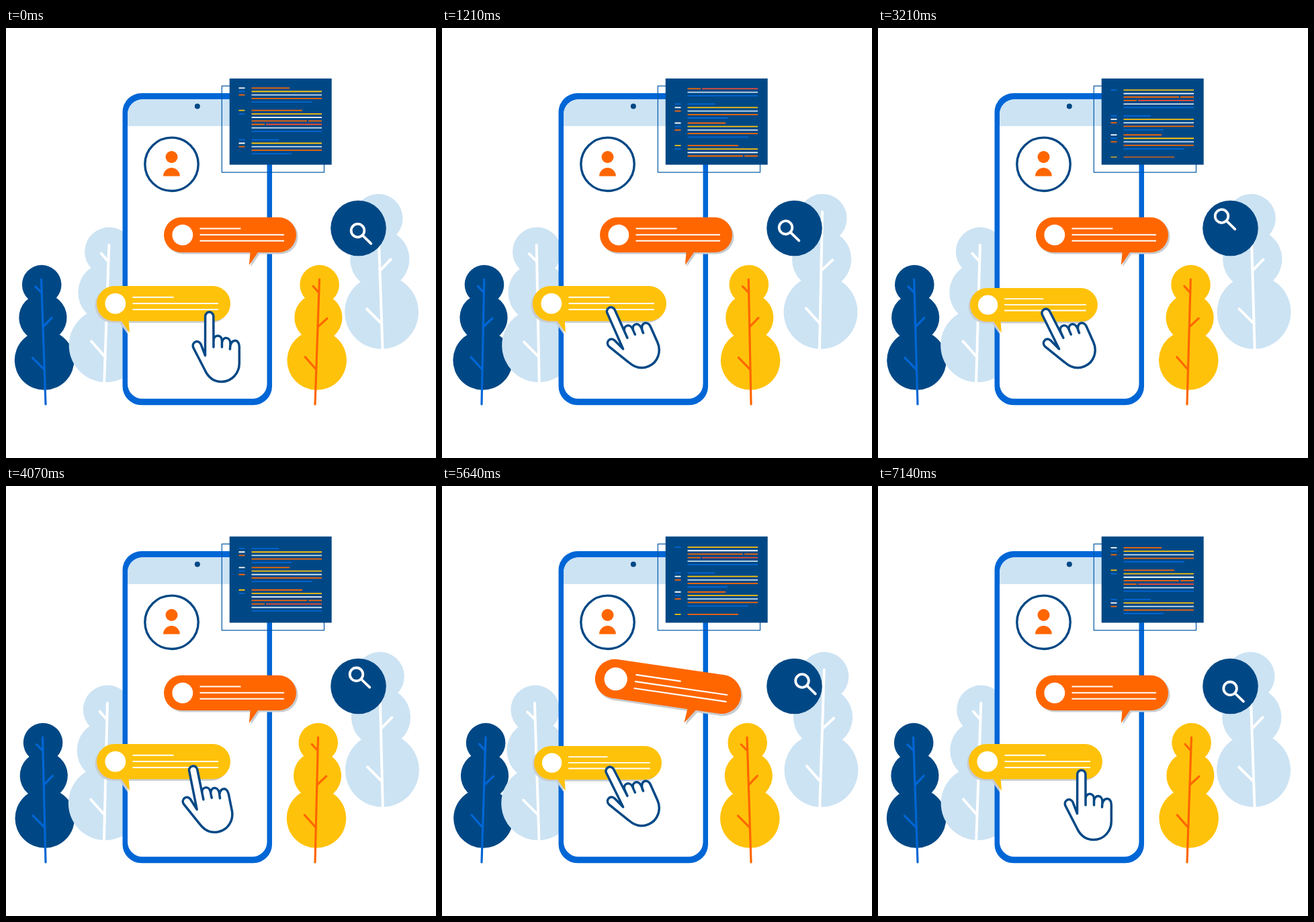
Recreate the animation shown at these times as an HTML page. Size 640 by 640 pixels, loop 7.21 s.

```html
<!DOCTYPE html>
<html lang="en">
<head>
<meta charset="utf-8">
<title>Chat illustration</title>
<style>
  html, body { margin: 0; height: 100%; overflow: hidden; background: #fff; }
  svg { display: block; width: 100vw; height: 100vh; }
</style>
</head>
<body>
<svg id="stage" viewBox="0 0 640 640"></svg>
<script>
const NAVY = '#004885', BLUE = '#0066d6', PALE = '#cce3f3', ORANGE = '#ff6600',
      YELLOW = '#ffc20a', RED = '#f44c32', WHITE = '#fff', SHADE = '#c9cccf';
const LOOP = 7210, SWAY = 3600, TAP = 2400;
const SCROLL = 105.3, CODE_TOP = 90, PITCH = 5.2;

// Markup helpers

const line = (x1, x2, y, color, width) =>
  `<path d="M${x1} ${y}H${x2}" stroke="${color}" stroke-width="${width}"/>`;

const tree = (id, leaf, stem) => `<g id="${id}">
  <g fill="${leaf}"><circle cx=".4" cy="-178" r="29.3"/><circle cx=".4" cy="-129" r="35.6"/>
    <circle cx=".4" cy="-65.5" r="44.3"/></g>
  <path d="M0 0V-186M-17.2-69.8L0-51.5M13.5-128.3L0-115M-9-175.5L0-166"
    fill="none" stroke="${stem}" stroke-width="3.2" stroke-linecap="round"/></g>`;

function bubble(id, color, x, y, width, tail, shadowX) {
  const shape = `<rect x="${x}" y="${y}" width="${width}" height="52.3" rx="26.1"/><path d="${tail}"/>`;
  const text = x + 53.5;
  return `<g id="${id}">
    <g fill="${SHADE}" transform="translate(${shadowX} 2.5)">${shape}</g>
    <g fill="${color}">${shape}</g>
    <circle cx="${x + 27.8}" cy="${y + 26.2}" r="15.4" fill="${WHITE}"/>
    ${line(text, text + 61, y + 16.8, WHITE, 2)}
    ${line(text, text + width - 71.5, y + 25.9, WHITE, 2)}
    ${line(text, text + width - 71.5, y + 35, WHITE, 2)}</g>`;
}

// Each row: optional gutter mark colour, then [end, colour] segments from the left margin.
const codeBlocks = [
  { y: 0, rows: [[WHITE, [422, ORANGE]], [BLUE, [470, YELLOW]], [ORANGE, [470, PALE]],
    [null, [470, ORANGE]], [null, [456, BLUE]]] },
  { y: 33.4, rows: [[YELLOW, [441, ORANGE]], [BLUE, [470, YELLOW]], [null, [470, WHITE]],
    [null, [448, ORANGE], [470, ORANGE]], [null, [385, ORANGE], [470, RED]],
    [null, [470, PALE]], [null, [470, BLUE]]] },
  { y: 77, rows: [[BLUE, [406, BLUE]], [WHITE, [470, YELLOW]], [ORANGE, [470, PALE]],
    [null, [470, ORANGE]], [null, [425, BLUE]]] },
];

const code = codeBlocks.map(({ y, rows }) => rows.map(([mark, ...segments], i) => {
  const rowY = y + i * PITCH;
  let start = 365.5, out = mark ? line(346.5, 355.5, rowY, mark, 1.8) : '';
  for (const [end, color] of segments) {
    out += line(start, end, rowY, color, 1.8);
    start = end + 2;
  }
  return out;
}).join('')).join('');

const stage = document.getElementById('stage');
stage.innerHTML = `
  <defs>
    <clipPath id="screen"><rect x="181" y="106.3" width="207.5" height="445.5" rx="22"/></clipPath>
    <clipPath id="codeArea"><rect x="333" y="88" width="152" height="104.8"/></clipPath>
  </defs>
  ${tree('navyTree', NAVY, BLUE)}
  ${tree('leftTree', PALE, WHITE)}
  <rect x="173.5" y="97" width="222.5" height="464.3" rx="28" fill="${BLUE}"/>
  <g clip-path="url(#screen)">
    <rect x="173" y="97" width="223" height="465" fill="${WHITE}"/>
    <rect x="173" y="97" width="223" height="49" fill="${PALE}"/>
  </g>
  <circle cx="284.8" cy="116.5" r="4" fill="${NAVY}"/>
  <circle cx="246.5" cy="202.8" r="39.7" fill="${WHITE}" stroke="${NAVY}" stroke-width="3.4"/>
  <g fill="${ORANGE}"><circle cx="246.5" cy="192" r="9"/>
    <path d="M234 220.4a12.4 12.4 0 0 1 24.8 0z"/></g>
  ${tree('rightTree', PALE, WHITE)}
  ${tree('yellowTree', YELLOW, ORANGE)}
  <circle cx="524.5" cy="298" r="41.3" fill="${NAVY}"/>
  <g id="lens" fill="none" stroke="${WHITE}" stroke-width="3.8" stroke-linecap="round">
    <circle r="9.8"/><path d="M7.2 7.2L19.8 19.4"/></g>
  <rect x="321.3" y="86.3" width="152.2" height="128.5" fill="none" stroke="#0058a8" stroke-width="1.2"/>
  <rect x="332.7" y="75.2" width="152" height="128.3" fill="${NAVY}"/>
  <g clip-path="url(#codeArea)"><g id="code">${code}<g transform="translate(0 ${SCROLL})">${code}</g></g></g>
  ${bubble('orangeBubble', ORANGE, 235, 281.8, 197, 'M363.8 331L361.8 353L377 331z', 2.5)}
  ${bubble('yellowBubble', YELLOW, 135, 384, 199, 'M169.5 433L184 453.8L182.5 433z', -2.5)}
  <path id="hand" fill="${WHITE}" stroke="${NAVY}" stroke-width="3.5" stroke-linecap="round" stroke-linejoin="round"/>`;

const part = Object.fromEntries([...stage.querySelectorAll('g[id], path[id]')].map(el => [el.id, el]));
const move = (name, transform) => part[name].setAttribute('transform', transform);
const scaleAround = (s, x, y) => `translate(${x} ${y}) scale(${s}) translate(${-x} ${-y})`;

// Motion helpers

// Equals cubic-bezier(.42, 0, .58, 1).
function ease(x) {
  let low = 0, high = 1, u = 0.5;
  for (let i = 0; i < 18; i++) {
    u = (low + high) / 2;
    const at = 1.26 * u * (1 - u) ** 2 + 1.74 * (1 - u) * u * u + u ** 3;
    if (at < x) low = u; else high = u;
  }
  return u * u * (3 - 2 * u);
}

// Eased value through [fraction, value] keys.
function track(p, keys) {
  const next = keys.findIndex(key => key[0] > p);
  if (next === 0) return keys[0][1];
  if (next < 0) return keys[keys.length - 1][1];
  const [a, from] = keys[next - 1], [b, to] = keys[next];
  return from + (to - from) * ease((p - a) / (b - a));
}

// Smooth closed path through [time, x, y].
const lensPath = [[0, 523.5, 301.5], [1210, 511.5, 297], [2070, 507, 291],
  [3210, 511.5, 280], [4930, 532, 283.5], [5640, 536, 290]];

function lensAt(t) {
  const n = lensPath.length;
  const knot = i => {
    const [time, x, y] = lensPath[(i + n) % n];
    return [time + Math.floor(i / n) * LOOP, x, y];
  };
  const slope = (i, axis) => (knot(i + 1)[axis] - knot(i - 1)[axis]) / (knot(i + 1)[0] - knot(i - 1)[0]);
  let i = n - 1;
  while (knot(i)[0] > t) i--;
  const a = knot(i), b = knot(i + 1), span = b[0] - a[0], u = (t - a[0]) / span;
  const blend = u * u * (3 - 2 * u);
  return [1, 2].map(axis => a[axis] + (b[axis] - a[axis]) * blend
    + span * (slope(i, axis) * u * (1 - u) ** 2 - slope(i + 1, axis) * u * u * (1 - u)));
}

// The index finger bends a little as it presses.
function handPath(press) {
  const x = 296.7 - 2.4 * press, y = 429 + 1.7 * press;
  return `M296.5 487.5L${x} ${y}a6.1 6.1 0 0 1 12.2 0L309 475V466
    C309 455.5 321.5 455.5 321.5 466V475V469C322 458.5 334 459 334 470L333.5 478
    C333 462 347.3 462 347.3 474V499C347.3 514 336 526.5 321 526.5
    C310 526.5 301 520 296 509L279 476C275.5 468 286 462.500 290 470.500Z`;
}

function draw(now) {
  const t = now % LOOP, ahead = t + 15;
  const sway = ahead % SWAY / SWAY, tap = ahead % TAP / TAP;

  const angle = track(sway, [[0, -2], [.5, 2], [1, -2]]);
  move('navyTree', `translate(59 560) rotate(${angle})`);
  move('yellowTree', `translate(460 560) rotate(${-angle})`);
  move('leftTree', `translate(145.3 553.5) rotate(${-angle}) scale(1.24)`);
  move('rightTree', `translate(561.4 504) rotate(${angle}) scale(1.24)`);

  const pop = track(sway, [[.5, 0], [.6, 1], [.7, 0]]);
  move('orangeBubble', `rotate(${10 * pop} 368 348) ${scaleAround(1 + .135 * pop, 368, 348)}`);

  const press = track(tap, [[.2, 0], [.35, 1], [.5, 0]]);
  move('yellowBubble', scaleAround(1 - .046 * press, 180, 452));
  const reach = track(tap, [[0, 0], [.2, 1], [.6, 1], [.8, 0]]);
  part.hand.setAttribute('d', handPath(press));
  move('hand', `rotate(${-24 * reach} 260 546)`);

  move('code', `translate(0 ${CODE_TOP - SCROLL * tap})`);
  move('lens', `translate(${lensAt(t).join(' ')})`);
}

const start = performance.now();
function tick() {
  draw(performance.now() - start);
  requestAnimationFrame(tick);
}
tick();
</script>
</body>
</html>
```
